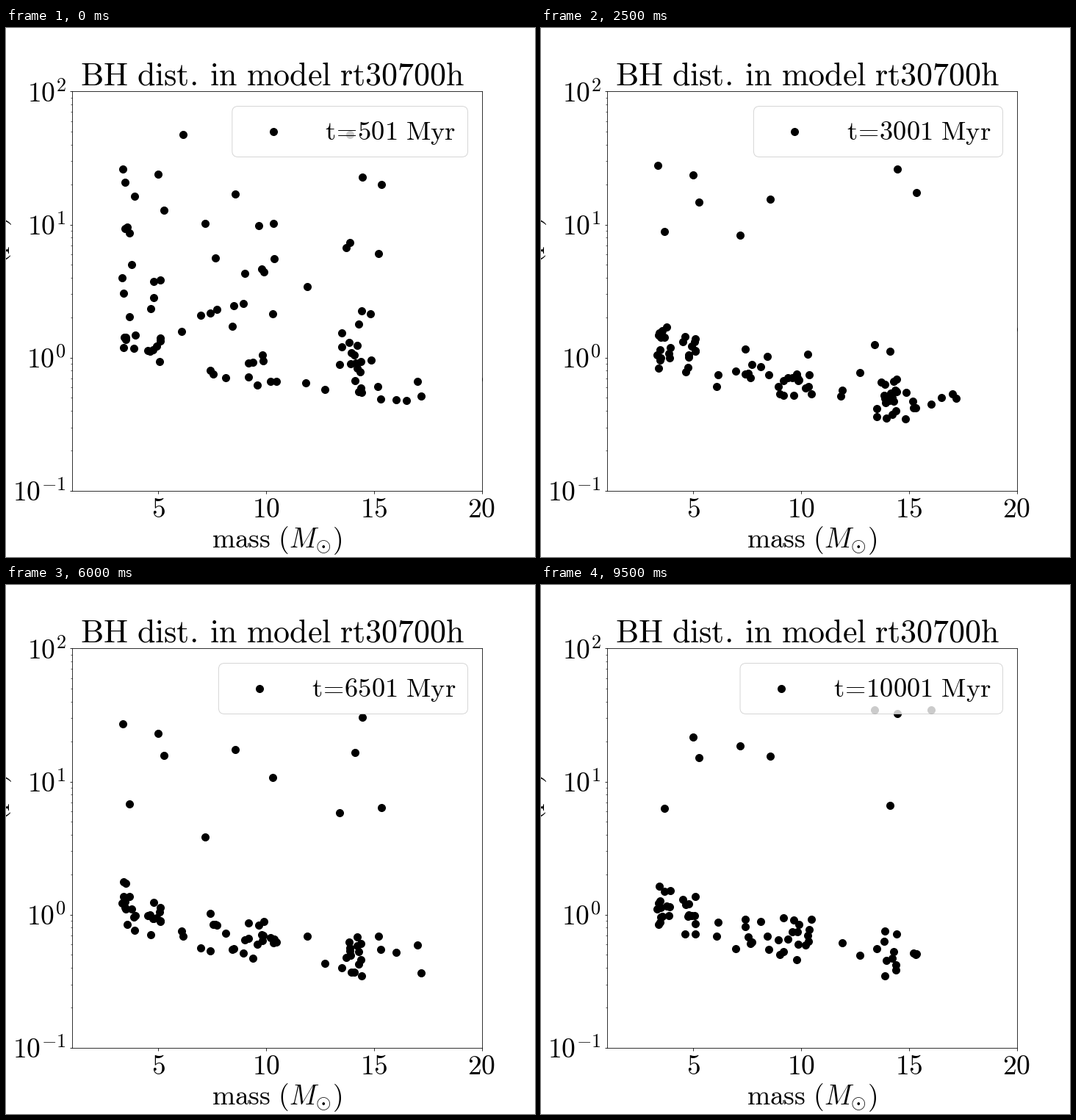
These frames come from a looping animation (720 by 720 pixels, 10000 ms). A matplotlib script:

```python
import matplotlib.pyplot as plt
import numpy as np
from matplotlib.animation import FuncAnimation
from matplotlib.patches import FancyBboxPatch

SIZE, FRAMES, INTERVAL = 720, 20, 500
LEFT, RIGHT, TOP, BOTTOM = 90, 648, 86.4, 630
DECADE = (BOTTOM - TOP) / 3
UNIT = (RIGHT - LEFT) / 19

# Mass groups in stage pixels: star count, lowest x, highest x.
GROUPS = [(14, 158, 177), (11, 192, 211), (2, 236, 241), (24, 263, 374),
          (3, 400, 436), (19, 454, 486), (8, 491, 568)]

# Outer stars drift slowly: x -> y at the first and the last step.
HALO = {168: (272, 300), 207: (200, 204), 215: (240, 234),
        312: (235, 226), 485: (194, 180)}

# Stars on changing orbits: x -> y at the key steps; short rows leave early.
KEY_STEPS = (0, 3, 8, 12, 19)
WANDERERS = {159: (192, 184, 191, 189), 271: (266, 268, 302, 343, 219),
             363: (389, 484, 383, 262, 477), 454: (458, 501, 325, 310, 170),
             475: (480, 490, 365, 228, 300), 511: (213, 214, 238, 303, 502),
             531: (506, 514, 510, 500, 170), 653: (478, 342, 512)}

rng = np.random.default_rng(12)
mass_x = np.concatenate([rng.uniform(low, high, n) for n, low, high in GROUPS])
settled_y = np.interp(mass_x, [160, 240, 330, 480], [435, 458, 480, 503])
start_y = np.maximum(settled_y + 5 - rng.exponential(80, mass_x.size), 145)
lifetime = np.where(mass_x < 390, FRAMES, rng.uniform(5, 34, mass_x.size))
scatter = 17 * rng.normal(size=(FRAMES, mass_x.size)).clip(-1.8, 1.8)
halo_scatter = 4 * rng.normal(size=(FRAMES, len(HALO)))


def star_positions(step):
    """Most stars sink towards a level set by their mass, then scatter about it."""
    settling = 1 - np.exp(-0.9 * step)
    y = start_y + settling * (settled_y + scatter[step] - start_y)
    points = [p for p, life in zip(zip(mass_x, y), lifetime) if step <= life]
    for (x, (first, last)), wobble in zip(HALO.items(), halo_scatter[step]):
        points.append((x, first + (last - first) * step / (FRAMES - 1) + wobble))
    for x, path in WANDERERS.items():
        steps = KEY_STEPS[:len(path)]
        if step <= steps[-1]:
            points.append((x, np.interp(step, steps, path)))
    return points


plt.rcParams["mathtext.fontset"] = "cm"
fig = plt.figure(figsize=(10, 10), dpi=72, facecolor="white")
ax = fig.add_axes([LEFT / SIZE, 1 - BOTTOM / SIZE,
                   (RIGHT - LEFT) / SIZE, (BOTTOM - TOP) / SIZE])
ax.set(xlim=(LEFT, RIGHT), ylim=(BOTTOM, TOP))


def label(x, y, text, size, ha="center", **style):
    fig.text(x / SIZE, 1 - y / SIZE, f"${text}$", fontsize=size,
             ha=ha, va="baseline", **style)


def mass_to_x(mass):
    return LEFT + (mass - 1) * UNIT


def decade_to_y(decade):
    return BOTTOM - DECADE * decade


masses, decades = range(5, 21, 5), range(4)
ax.set_xticks([mass_to_x(m) for m in masses])
ax.set_yticks([decade_to_y(k) for k in decades])
ax.set_yticks([decade_to_y(k + np.log10(j)) for k in range(3) for j in range(2, 10)],
              minor=True)
ax.tick_params(which="both", labelbottom=False, labelleft=False)

for mass in masses:
    label(mass_to_x(mass) - 0.5, 666, str(mass), 37.5)
for k in decades:
    label(81.5, decade_to_y(k) + 14.5, f"10^{{{k - 1}}}", 37.5, ha="right")
label(101, 78, r"\mathrm{BH\ dist.\:in\ model\ rt30700h}", 44, ha="left")
label(368.5, 707, r"\mathrm{mass}\ (M_{\odot})", 37.5)
label(-1.5, 257, r"\mathrm{radius}\ (\mathrm{pc})", 37.5, ha="right",
      rotation=90, rotation_mode="anchor")

dot_style = dict(s=100, c="black", linewidths=1)
stars = ax.scatter([], [], **dot_style)
legend_box = FancyBboxPatch((LEFT, TOP), 1, 1, boxstyle="round,pad=0,rounding_size=8",
                            fc="white", ec="0.8", lw=1, alpha=0.8, zorder=5)
ax.add_patch(legend_box)
legend_dot = ax.scatter([], [], zorder=6, **dot_style)
legend_text = ax.text(0, 152, "", fontsize=36.5, ha="left", va="baseline", zorder=6)


def update(step):
    age = 501 + 500 * step
    left = 307.8 - 18.4 * (len(str(age)) - 3)
    stars.set_offsets(star_positions(step))
    legend_box.set_bounds(left, 106.5, 628.5 - left, 69)
    legend_dot.set_offsets([(left + 56, 141)])
    legend_text.set_x(left + 126.5)
    legend_text.set_text(rf"$\mathrm{{t}}\!=\!{age}\ \mathrm{{Myr}}$")
    return stars, legend_box, legend_dot, legend_text


animation = FuncAnimation(fig, update, frames=FRAMES, interval=INTERVAL,
                          repeat=True, repeat_delay=0)
plt.show()
```
